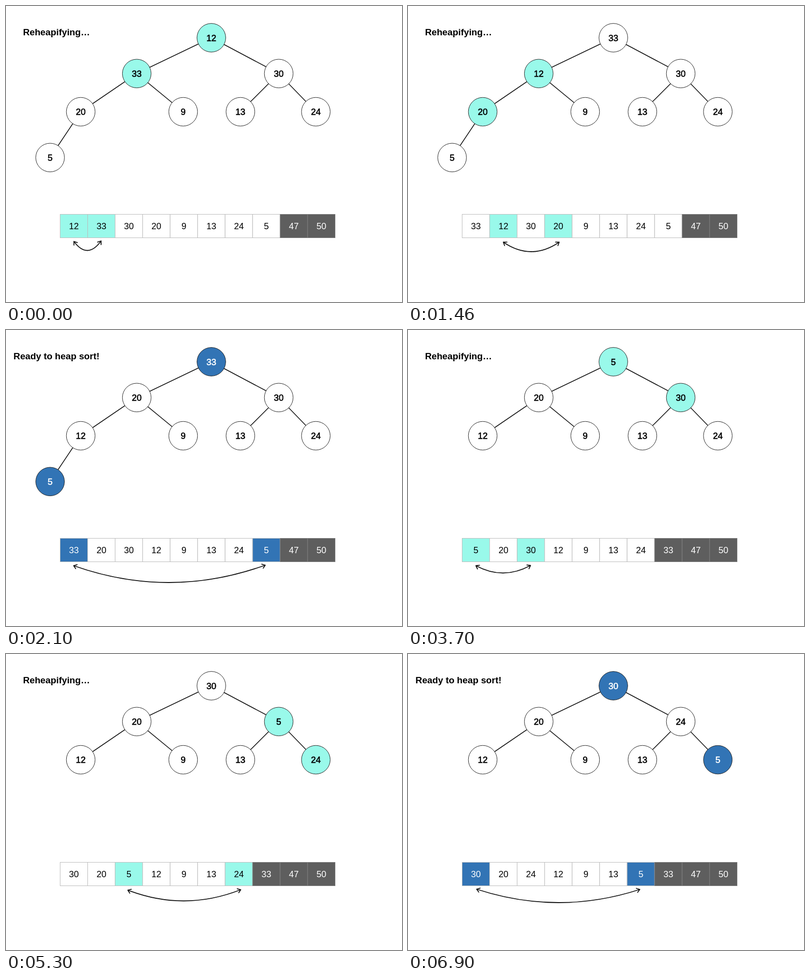
Animation, 808 px wide and 606 px high, one loop 8 s. Source, as an HTML page:

```html
<!DOCTYPE html>
<html lang="en">
<head>
<meta charset="utf-8">
<title>Heap sort</title>
<style>
  html, body { margin: 0; width: 100%; height: 100%; overflow: hidden; background: #fff; }
  svg { display: block; width: 808px; height: 606px; }
  text { font: 18px "Liberation Sans", Arial, sans-serif; text-anchor: middle; }
  .title { font-size: 18.8px; font-weight: bold; }
  .node { stroke-width: .6px; }
  .edge { stroke: #111; stroke-width: 1.6; }
  .arrow { fill: none; stroke: #111; stroke-width: 1.8; stroke-linecap: round; stroke-linejoin: round; }
</style>
</head>
<body>
<svg id="stage" viewBox="0 0 808 606"></svg>
<script>
const TEAL = '#99f9ea', BLUE = '#3274b5', GRAY = '#5e5e5e';
const LOOP = 8000, RADIUS = 29.3, CELL = 56.1, LEFT = 110.5;

const nodes = [[419, 65], [266.8, 138.3], [556.5, 138.3], [152.5, 216.5],
  [361.5, 216.5], [478.3, 216.5], [632.2, 216.5], [90, 310.3]];

// size: heap length; pair: swapped indices; arc: x1, y1, x2, y2, lowest y
const steps = [
  { at: 0, size: 8, pair: [0, 1], values: [12, 33, 30, 20, 9, 13, 24, 5, 47, 50], arc: [138.5, 482, 194, 481, 500.5] },
  { at: 500, size: 8, pair: [1, 3], values: [33, 12, 30, 20, 9, 13, 24, 5, 47, 50], arc: [194.5, 483.5, 308.5, 483.5, 503] },
  { at: 2100, size: 8, pair: [0, 7], ready: true, values: [33, 20, 30, 12, 9, 13, 24, 5, 47, 50], arc: [138, 482.5, 529, 481.5, 517] },
  { at: 3700, size: 7, pair: [0, 2], values: [5, 20, 30, 12, 9, 13, 24, 33, 47, 50], arc: [138.5, 482.5, 250, 482, 497.5] },
  { at: 5300, size: 7, pair: [2, 6], values: [30, 20, 5, 12, 9, 13, 24, 33, 47, 50], arc: [248.5, 483.5, 479, 482.5, 505.5] },
  { at: 6900, size: 7, pair: [0, 6], ready: true, values: [30, 20, 24, 12, 9, 13, 5, 33, 47, 50], arc: [140, 481.5, 473, 482, 509] }
];

const text = (x, y, label, color = '#000', cls = '') =>
  `<text x="${x}" y="${y}" fill="${color}" stroke="${cls === 'node' ? color : 'none'}" class="${cls}">${label}</text>`;

// Open arrowhead at (x, y) whose shaft leads towards (tx, ty)
function head(x, y, tx, ty) {
  const angle = Math.atan2(ty - y, tx - x);
  const barb = turn => `${x + 7.5 * Math.cos(angle + turn)} ${y + 7.5 * Math.sin(angle + turn)}`;
  return `M${barb(-0.62)}L${x} ${y}L${barb(0.62)}`;
}

function arrow([x1, y1, x2, y2, low]) {
  const cx = (x1 + x2) / 2, cy = 2 * low - (y1 + y2) / 2;
  return `<path class="arrow" d="M${x1} ${y1}Q${cx} ${cy} ${x2} ${y2}${head(x1, y1, cx, cy)}${head(x2, y2, cx, cy)}"/>`;
}

function render({ size, pair, ready, values, arc }) {
  const mark = ready ? BLUE : TEAL;
  const fill = i => i >= size ? GRAY : pair.includes(i) ? mark : '#fff';
  const ink = i => [GRAY, BLUE].includes(fill(i)) ? '#fff' : '#000';
  const heap = nodes.slice(0, size);

  const edges = heap.slice(1).map(([x, y], i) => {
    const [px, py] = nodes[i >> 1];
    return `<line class="edge" x1="${px}" y1="${py}" x2="${x}" y2="${y}"/>`;
  });
  const circles = heap.map(([x, y], i) =>
    `<circle cx="${x}" cy="${y}" r="${RADIUS}" fill="${fill(i)}" stroke="#222"/>` +
    text(x, y + 6.9, values[i], ink(i), 'node'));
  const cells = values.map((value, i) => {
    const x = LEFT + i * CELL;
    return `<rect x="${x}" y="426.5" width="${CELL}" height="48" fill="${fill(i)}" stroke="${i < size ? '#bbb' : '#808080'}"/>` +
      text(x + CELL / 2, 457.3, value, ink(i));
  });
  const title = text(103, 60, ready ? 'Ready to heap sort!' : 'Reheapifying…', '#000', 'title');

  document.getElementById('stage').innerHTML =
    [title, ...edges, ...circles, ...cells, arrow(arc)].join('');
}

let shown;
function tick() {
  const time = performance.now() % LOOP;
  const step = steps.findLast(s => s.at <= time);
  if (step !== shown) render(shown = step);
  requestAnimationFrame(tick);
}
tick();
</script>
</body>
</html>
```
